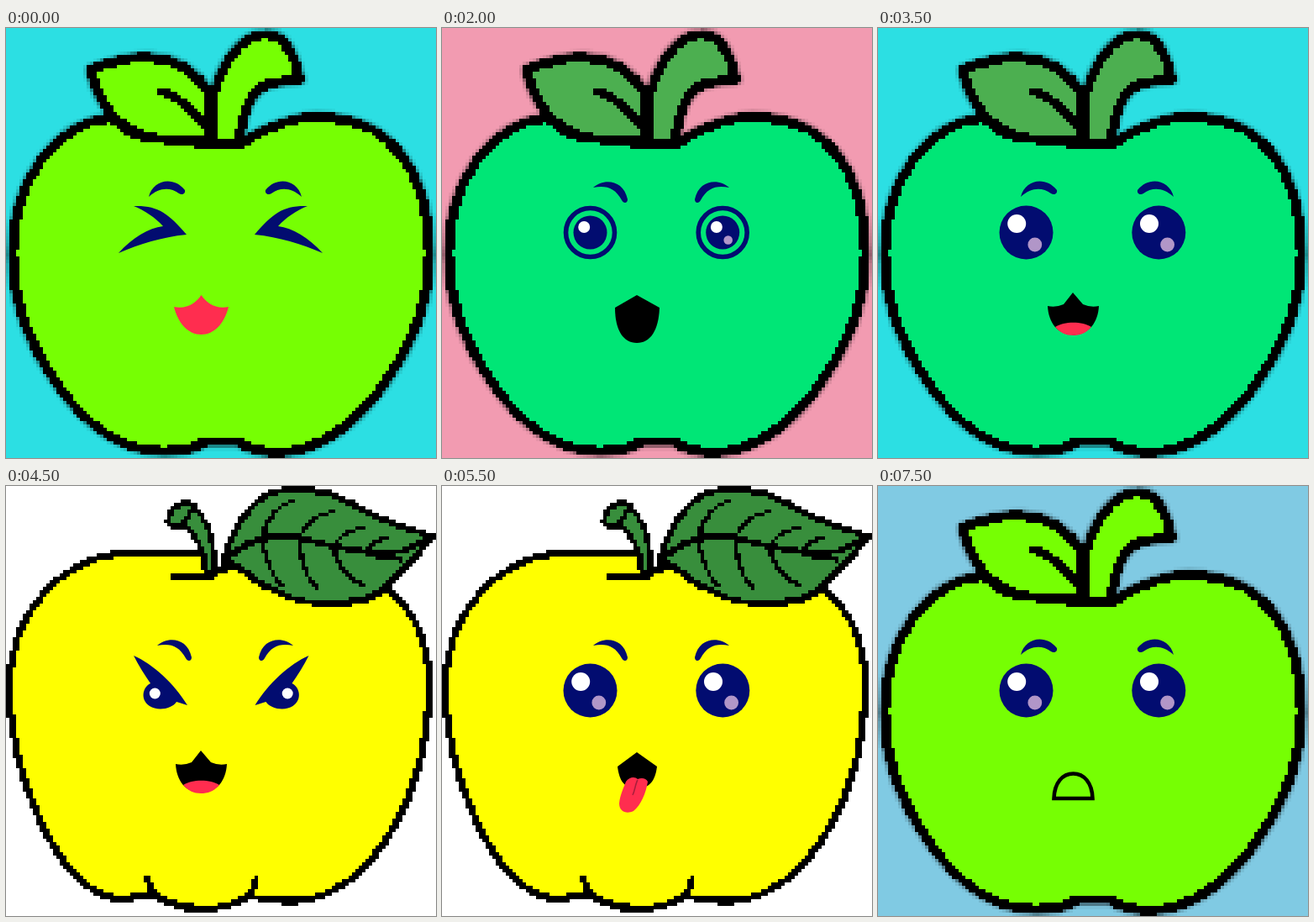
An HTML page with a canvas for the animation above (8000 ms loop, 512x512 px).

```html
<!DOCTYPE html>
<html lang="en">
<head>
<meta charset="utf-8">
<title>Apple faces</title>
<style>
html, body { margin: 0; width: 100%; height: 100%; overflow: hidden; }
canvas { display: block; width: 100vw; height: 100vh; }
</style>
</head>
<body>
<canvas id="stage" width="512" height="512"></canvas>
<script>
const STEP = 500, SIZE = 512, CELL = 4, GRID = SIZE / CELL;
const NAVY = '#020c70', RED = '#ff2d4f', LILAC = '#b196c8', BLACK = '#000', WHITE = '#fff';
const CYAN = '#2cdfe3', PINK = '#f29bb1', SKY = '#80cae3';

const ctx = document.getElementById('stage').getContext('2d');

// Each part is [path, fill role, ink width]; parts without a role are only inked.
const shapes = {
  round: {
    ink: 10, halo: 0.2,
    parts: [
      ['M126 107C60 112 8 182 8 270C8 370 90 504 188 504C215 504 228 500 237 492L275 492C290 502 300 505 320 505C420 505 504 370 504 270C504 175 462 106 370 106C330 106 302 124 283 136L240 138L180 131C155 129 140 122 126 107Z', 'body'],
      ['M101 50C140 34 210 18 243 80L243 132L180 131C135 128 108 85 101 50Z', 'leaf'],
      ['M184 75C205 78 220 98 241 120'],
      ['M246 137L246 84C255 45 280 8 308 8C335 6 344 36 350 61L318 65C295 70 281 95 278 137Z', 'leaf']
    ]
  },
  lobed: {
    ink: 8, halo: 0,
    parts: [
      ['M240 80L140 80C68 84 4 150 4 240C4 330 58 491 140 491L176 487C200 500 215 504 234 504C260 504 275 497 291 487C305 495 325 495 345 494C440 486 504 360 504 240C504 190 490 150 452 120L400 118L290 90L250 102Z', 'body'],
      ['M167 466L176 487M299 467L291 487M198 107H248', '', 7],
      ['M258 95C262 75 275 35 310 10C340 0 380 2 410 20C440 40 470 48 508 60C490 85 465 105 447 125C425 142 370 145 335 132C305 120 285 105 270 92Z', 'leaf', 7],
      ['M260 90C280 68 310 55 350 62C400 76 440 84 472 77L508 60', '', 7],
      ['M305 60Q315 25 342 17M305 62Q310 100 328 118M348 62Q362 34 390 30M350 65Q352 105 370 122M390 72Q402 52 427 50M390 75Q398 105 425 118M430 78Q438 64 455 62M430 80Q445 87 470 88', '', 5],
      ['M192 42C192 32 205 19 215 19C222 19 225 24 230 31C243 48 249 72 249 105L238 105C238 75 222 50 208 46C200 48 193 47 192 42Z', 'leaf', 6],
      ['M222 23C223 33 213 43 206 46', '', 5]
    ]
  }
};

const skins = {
  lime: { shape: 'round', body: '#76ff03', leaf: '#76ff03' },
  mint: { shape: 'round', body: '#00e676', leaf: '#4caf50' },
  yellow: { shape: 'lobed', body: '#ffff00', leaf: '#388e3c' },
  green: { shape: 'lobed', body: '#76ff03', leaf: '#388e3c' }
};

function gridLayer() {
  const layer = document.createElement('canvas');
  layer.width = layer.height = GRID;
  const c = layer.getContext('2d', { willReadFrequently: true });
  c.scale(1 / CELL, 1 / CELL);
  c.lineCap = c.lineJoin = 'round';
  return c;
}

// Hard pixel edges; shapes with a halo keep a soft rim outside.
function pixelApple(skin) {
  const shape = shapes[skin.shape], fill = gridLayer(), ink = gridLayer();
  for (const [d, role, width = shape.ink] of shape.parts) {
    const path = new Path2D(d);
    if (role) {
      fill.fillStyle = skin[role];
      fill.fill(path);
      ink.globalCompositeOperation = 'destination-out';
      ink.fill(path);
      ink.globalCompositeOperation = 'source-over';
    }
    if (role && shape.halo) {
      ink.globalAlpha = shape.halo;
      ink.lineWidth = width + 7;
      ink.stroke(path);
      ink.globalAlpha = 1;
    }
    ink.lineWidth = width;
    ink.stroke(path);
  }
  const image = fill.getImageData(0, 0, GRID, GRID), px = image.data;
  const line = ink.getImageData(0, 0, GRID, GRID).data;
  for (let i = 0; i < px.length; i += 4) {
    const a = line[i + 3], inked = a > 115, inside = px[i + 3] > 127;
    if (inked || !inside) {
      px[i] = px[i + 1] = px[i + 2] = 0;
      px[i + 3] = inked ? 255 : shape.halo ? a : 0;
    } else {
      px[i + 3] = 255;
    }
  }
  fill.putImageData(image, 0, 0);
  return fill.canvas;
}

function paint(d, color) {
  ctx.fillStyle = color;
  ctx.fill(new Path2D(d));
}

function trace(d, width, color = BLACK) {
  ctx.strokeStyle = color;
  ctx.lineWidth = width;
  ctx.stroke(new Path2D(d));
}

function oval(x, y, rx, color, ry = rx) {
  ctx.fillStyle = color;
  ctx.beginPath();
  ctx.ellipse(x, y, rx, ry, 0, 0, Math.PI * 2);
  ctx.fill();
}

// Draws once as is and once mirrored about x = sum / 2.
function both(sum, draw) {
  draw();
  ctx.save();
  ctx.translate(sum, 0);
  ctx.scale(-1, 1);
  draw();
  ctx.restore();
}

const brows = {
  soft: () => both(522, () => paint('M170 201C175 180 200 176 213 193C214 198 209 199 206 197C195 189 182 190 170 201Z', NAVY)),
  stern: () => both(522, () => paint('M180 190C192 179 216 180 221 204C221 209 216 209 214 205C206 190 195 187 180 190Z', NAVY))
};

const eyes = {
  squint: () => both(511, () => paint('M152 212C180 211 193 220 215 246C185 249 160 257 134 268C150 250 170 238 187 236C178 226 165 217 152 212Z', NAVY)),
  ring() {
    for (const x of [176.5, 334.2]) {
      trace(`M${x - 29} 243.5a29 29 0 1 0 58 0a29 29 0 1 0 -58 0Z`, 5.6, NAVY);
      oval(x, 243.5, 20, NAVY);
      oval(x - 7.3, 237, 7, WHITE);
    }
    oval(340.7, 252.5, 5.3, LILAC);
  },
  angry: () => both(512.5, () => {
    paint('M152 202C175 212 200 235 216 261C211 260 208 258 203 257C197 266 180 268 171 262C160 255 162 240 172 235C165 225 158 214 152 202Z', NAVY);
    oval(177.3, 247, 6.5, WHITE);
  }),
  big() {
    for (const x of [176.5, 334.3]) {
      oval(x, 243.5, 32, NAVY);
      oval(x - 11.3, 233, 11, WHITE);
      oval(x + 10.3, 258, 8.4, LILAC);
    }
  },
  lash() {
    both(512.5, () => {
      oval(189.7, 243.5, 19.7, NAVY, 32);
      paint('M158 265C168 268 173 262 180 262L184 270C175 274 164 271 158 265Z', NAVY);
    });
    for (const x of [195.3, 329]) oval(x, 235.5, 8.3, WHITE);
  }
};

const mouths = {
  smile: () => paint('M232.5 318C226 328 215 335 200 332C205 352 217 365 232.5 365C248 365 260 352 265 332C250 335 239 328 232.5 318Z', RED),
  gasp: () => paint('M232 318L259 333C258 360 248 375 232 375C216 375 206 360 206 333Z', BLACK),
  wail() {
    paint('M209 380C210 353 220 340 232 340C245 340 256 353 256 380Z', BLACK);
    paint('M211 380C215 358 250 358 254 380Z', RED);
  },
  grin() {
    paint('M232 315L244 329Q253 333 263 331C262 350 252 365 232 365C213 365 203 350 202 331Q212 333 221 329Z', BLACK);
    paint('M211 356C222 349 243 349 254 356C247 364 240 366 232 366C224 366 217 363 211 356Z', RED);
  },
  tongue() {
    paint('M232 317L256 334C254 350 248 360 232 360C216 360 211 350 209 334Z', BLACK);
    paint('M219 352C223 346 230 346 233 349C238 347 243 348 245 352C243 365 237 380 228 387C220 391 211 388 211 378C212 368 216 360 219 352Z', RED);
    trace('M233 350C230 355 230 362 227 368', 1.5, '#a81f3c');
  },
  teeth: () => trace('M220 345H245A14.3 14.3 0 0 1 245 374H220A14.3 14.3 0 0 1 220 345ZM219.5 345V374M232.5 345V374M245.5 345V374', 4),
  frown: () => trace('M209.5 372C210 353 220 342.5 232.5 342.5C245 342.5 255 353 255.5 372Z', 4.6)
};

const scenes = [
  [CYAN, 'lime', 'soft', 'squint', 'smile'],
  [WHITE, 'yellow', 'stern', 'big', 'grin'],
  [PINK, 'lime', 'soft', 'lash', 'frown'],
  [WHITE, 'yellow', 'soft', 'big', 'smile'],
  [PINK, 'mint', 'stern', 'ring', 'gasp'],
  [SKY, 'lime', 'stern', 'angry', 'teeth'],
  [WHITE, 'yellow', 'soft', 'squint', 'wail'],
  [CYAN, 'mint', 'soft', 'big', 'grin'],
  [WHITE, 'green', 'soft', 'lash', 'smile'],
  [WHITE, 'yellow', 'stern', 'angry', 'grin'],
  [PINK, 'lime', 'soft', 'ring', 'wail'],
  [WHITE, 'yellow', 'stern', 'big', 'tongue'],
  [WHITE, 'green', 'soft', 'squint', 'gasp'],
  [CYAN, 'mint', 'soft', 'lash', 'teeth'],
  [WHITE, 'yellow', 'stern', 'ring', 'smile'],
  [SKY, 'lime', 'soft', 'big', 'frown']
];

const apples = {};
for (const name in skins) apples[name] = pixelApple(skins[name]);

function draw([backdrop, skin, brow, eye, mouth]) {
  ctx.fillStyle = backdrop;
  ctx.fillRect(0, 0, SIZE, SIZE);
  ctx.imageSmoothingEnabled = false;
  ctx.drawImage(apples[skin], 0, 0, SIZE, SIZE);
  brows[brow]();
  eyes[eye]();
  mouths[mouth]();
}

const start = performance.now();
function tick() {
  const elapsed = performance.now() - start;
  draw(scenes[Math.floor(elapsed / STEP) % scenes.length]);
  requestAnimationFrame(tick);
}
tick();
</script>
</body>
</html>
```
